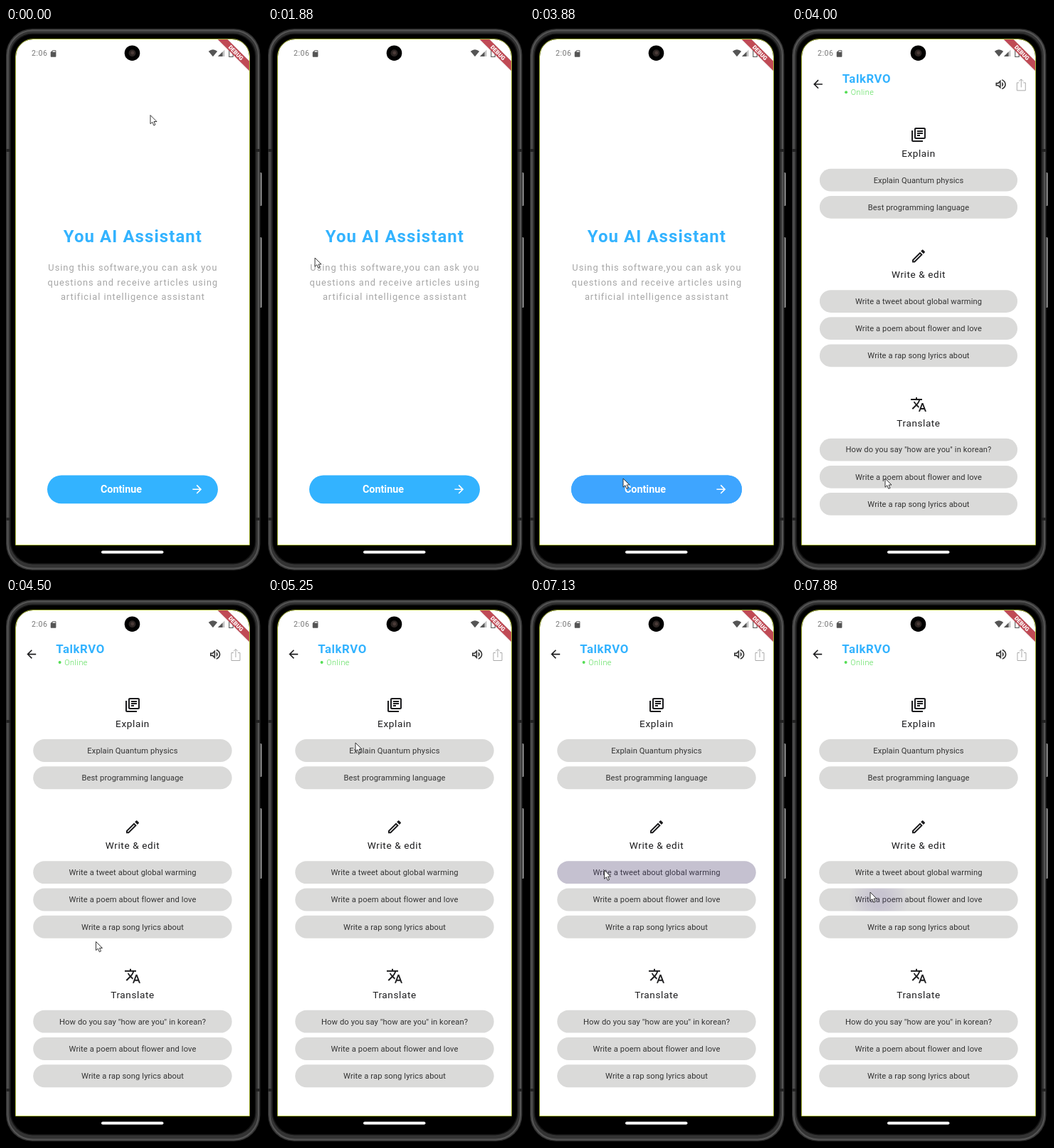
An HTML page for the animation above (8000 ms loop, 360 by 763 pixels).

```html
<!DOCTYPE html>
<html lang="en">
<head>
<meta charset="utf-8">
<title>Assistant app demo</title>
<style>
  html, body { margin: 0; width: 100%; height: 100%; overflow: hidden; background: #000; }
  svg { display: block; width: 360px; height: 763px; font-family: Roboto, sans-serif; }
  .mid { text-anchor: middle; }
  .title { font-size: 24px; font-weight: 600; letter-spacing: 1.05px; fill: #33b3ff; }
  .intro { font-size: 12.8px; letter-spacing: 1px; fill: #a6a6a6; }
  .action { font-size: 14.4px; font-weight: 600; fill: #fff; }
  .name { font-size: 16.8px; font-weight: 600; letter-spacing: .6px; fill: #33b3ff; }
  .online { font-size: 10.8px; font-weight: 300; letter-spacing: .5px; fill: #55dd55; }
  .heading { font-size: 13.6px; letter-spacing: .6px; fill: #1c1c1e; }
  .label { font-size: 11.2px; letter-spacing: .1px; fill: #333; }
  .clock { font-size: 10.6px; letter-spacing: .5px; fill: #777; }
  .debug { font-size: 8.1px; font-weight: 900; fill: #fff; }
</style>
</head>
<body>
<svg viewBox="0 0 360 763">
  <defs>
    <clipPath id="screen"><path d="M14 726V40a24 24 0 0 1 24-24H318a24 24 0 0 1 24 24V726z"/></clipPath>
    <clipPath id="button"><rect x="58" y="628.5" width="240" height="39.7" rx="19.85"/></clipPath>
    <clipPath id="poem"><rect x="38.2" y="406.5" width="279.5" height="31.9" rx="15.95"/></clipPath>
    <radialGradient id="ink">
      <stop offset=".25" stop-color="#6750a4" stop-opacity=".16"/>
      <stop offset="1" stop-color="#6750a4" stop-opacity="0"/>
    </radialGradient>
  </defs>

  <!-- phone body -->
  <g fill="#777">
    <rect x="355" y="203" width="5" height="47" rx="1.5"/>
    <rect x="355" y="294" width="5" height="99" rx="1.5"/>
  </g>
  <rect x="0" y="1" width="357.5" height="761" rx="37" fill="#333"/>
  <rect x="2.5" y="3.5" width="352.5" height="756" rx="35" fill="none" stroke="#555" stroke-width="2"/>
  <path d="M0 172h6M351 172h6M0 690h6M351 690h6" stroke="#222" stroke-width="4"/>
  <rect x="5.5" y="7.5" width="346" height="746" rx="32" fill="#141414"/>
  <rect x="7" y="9" width="343" height="743" rx="31"/>
  <rect x="134" y="734.5" width="87.5" height="4" rx="2" fill="#fff"/>

  <g clip-path="url(#screen)">
    <rect x="14" y="16" width="328" height="710" fill="#fff"/>

    <g id="welcome">
      <text class="mid title" x="178.4" y="300.5">You AI Assistant</text>
      <g class="mid intro">
        <text x="178.4" y="341.3">Using this software,you can ask you</text>
        <text x="178.4" y="361.8">questions and receive articles using</text>
        <text x="178.4" y="382.3">artificial intelligence assistant</text>
      </g>
      <g clip-path="url(#button)">
        <rect x="58" y="628" width="240" height="41" fill="#33b3ff"/>
        <circle id="press" cx="133" cy="648" fill="#3ea5ff"/>
      </g>
      <text class="mid action" x="162" y="653.2">Continue</text>
      <path fill="#fff" transform="translate(259.2 638.6) scale(.8)"
        d="M12 4l-1.41 1.41L16.17 11H4v2h12.17l-5.58 5.59L12 20l8-8z"/>
    </g>

    <g id="chat">
      <path fill="#1c1c1e" transform="translate(26.2 68) scale(.8)"
        d="M20 11H7.83l5.59-5.59L12 4l-8 8 8 8 1.41-1.41L7.83 13H20v-2z"/>
      <text class="name" x="70.3" y="75.8">TalkRVO</text>
      <circle cx="75.6" cy="89" r="2" fill="#55dd55"/>
      <text class="online" x="82.3" y="92.8">Online</text>
      <path fill="#333" transform="translate(284.6 68.2) scale(.8)"
        d="M3 9v6h4l5 5V4L7 9H3zm7-.17v6.34L7.83 13H5v-2h2.83L10 8.83zM16.5 12c0-1.77-1.02-3.29-2.5-4.03v8.05c1.48-.73 2.5-2.25 2.5-4.02zM14 3.23v2.06c2.89.86 5 3.54 5 6.71s-2.11 5.85-5 6.71v2.06c4.01-.91 7-4.49 7-8.77s-2.99-7.86-7-8.77z"/>
      <path fill="none" stroke="#aaa" d="M320 75.5h-3v11h12v-11h-3M323 82V70.5M320 73.5l3-3 3 3"/>
      <g id="sections"></g>
      <g id="tints" fill="#6750a4">
        <rect x="38.2" y="197" width="279.5" height="31.9" rx="15.95"/>
        <rect x="38.2" y="368.2" width="279.5" height="31.9" rx="15.95"/>
      </g>
      <g clip-path="url(#poem)"><circle id="splash" cx="122" cy="422" r="43" fill="url(#ink)"/></g>
    </g>

    <!-- status bar -->
    <text class="clock" x="36" y="39.2">2:06</text>
    <g fill="#555">
      <path transform="translate(60.8 30.2) scale(.48)"
        d="M18 2h-8L4 8v12c0 1.1.9 2 2 2h12c1.1 0 2-.9 2-2V4c0-1.1-.9-2-2-2zm-6 6h-2V4h2zm3 0h-2V4h2zm3 0h-2V4h2z"/>
      <path d="M284.8 32.8Q291 27.8 297.2 32.8L291 40.2z"/>
      <path d="M298 40L307.5 30.5V40z" opacity=".35"/>
      <path d="M298 40L304.5 33.5V40z"/>
    </g>
    <path d="M313.8 31.5h5.4v9h-5.4zM315.5 30.3h2" fill="none" stroke="#555" stroke-width="1.1"/>
    <g transform="translate(342.5 15.5) rotate(45)">
      <rect x="-45" y="21.9" width="90" height="10.4" fill="#000" opacity=".15"/>
      <rect x="-45" y="22.3" width="90" height="9.6" fill="#c04a55"/>
      <text class="mid debug" y="30">DEBUG</text>
    </g>
  </g>
  <path d="M13.5 726.5V40a24.5 24.5 0 0 1 24.5-24.5H318a24.5 24.5 0 0 1 24.5 24.5V726.5z"
    fill="none" stroke="#aebc3c"/>
  <circle cx="177.5" cy="35.2" r="10.8"/>
  <circle cx="177.5" cy="35.2" r="5" fill="#2b2422"/>
  <circle cx="177.8" cy="35" r="2.4" fill="#4a3b38"/>

  <path id="cursor" fill="#fff" stroke="#222" stroke-width=".9" stroke-linejoin="round"
    d="M0 0V12.2L2.8 9.7 4.9 14.4 7 13.4 5 9H9z"/>
</svg>
<script>
  const $ = id => document.getElementById(id);
  const LOOP = 8000, STEP = 125;

  const sections = [
    { title: 'Explain', y: 149, icon: 'M4 6H2v14c0 1.1.9 2 2 2h14v-2H4V6zm16-4H8c-1.1 0-2 .9-2 2v12c0 1.1.9 2 2 2h12c1.1 0 2-.9 2-2V4c0-1.1-.9-2-2-2zm0 14H8V4h12v12zM10 9h8v2h-8zm0 3h4v2h-4zm0-6h8v2h-8z',
      items: ['Explain Quantum physics', 'Best programming language'] },
    { title: 'Write &amp; edit', y: 320.2, icon: 'M14.06 9.02l.92.92L5.92 19H5v-.92l9.06-9.06M17.66 3c-.25 0-.51.1-.7.29l-1.83 1.83 3.75 3.75 1.83-1.83c.39-.39.39-1.02 0-1.41l-2.34-2.34c-.2-.2-.45-.29-.71-.29zm-3.6 3.19L3 17.25V21h3.75L17.81 9.94l-3.75-3.75z',
      items: ['Write a tweet about global warming', 'Write a poem about flower and love', 'Write a rap song lyrics about'] },
    { title: 'Translate', y: 529.7, icon: 'M12.87 15.07l-2.54-2.51.03-.03c1.74-1.94 2.98-4.17 3.71-6.53H17V4h-7V2H8v2H1v1.99h11.17C11.5 7.92 10.44 9.75 9 11.35 8.07 10.32 7.3 9.19 6.69 8h-2c.73 1.63 1.73 3.17 2.98 4.56l-5.09 5.02L4 19l5-5 3.11 3.11.76-2.04zM18.5 10h-2L12 22h2l1.12-3h4.75L21 22h2l-4.5-12zm-2.62 7l1.62-4.33L19.12 17h-3.24z',
      items: ['How do you say "how are you" in korean?', 'Write a poem about flower and love', 'Write a rap song lyrics about'] }
  ];

  const pill = (label, y) => `
    <rect x="38.2" y="${y}" width="279.5" height="31.9" rx="15.95" fill="#dadad9"/>
    <text class="mid label" x="178" y="${y + 19.8}">${label}</text>`;

  $('sections').innerHTML = sections.map(({ title, y, icon, items }) => `
    <path fill="#1c1c1e" transform="translate(166 ${y - 12})" d="${icon}"/>
    <text class="mid heading" x="178" y="${y + 30.8}">${title}</text>
    ${items.map((label, i) => pill(label, y + 48 + i * 38.33)).join('')}`).join('');

  // time, x, y of the pointer tip
  const path = [
    [0, 203, 122.5], [750, 203, 122.5], [1625, 64, 318], [1875, 66, 323], [2500, 116, 560],
    [3000, 131, 633], [4375, 131, 633], [4625, 122, 330], [4750, 122, 330], [5250, 123, 202],
    [5625, 123, 202], [6375, 105, 310], [6750, 104.5, 381], [7125, 104.5, 381],
    [7500, 110, 412], [LOOP, 110, 412]
  ];

  function pointer(t) {
    const i = path.findIndex(k => k[0] > t);
    const [t0, x0, y0] = path[i - 1], [t1, x1, y1] = path[i];
    const u = (t - t0) / (t1 - t0), e = u * u * (3 - 2 * u);
    return [x0 + (x1 - x0) * e, y0 + (y1 - y0) * e];
  }

  // a tapped pill lights up at once, then fades
  const tapTint = (t, start) => t < start ? 0 : .18 * Math.max(0, 1 - (t - start) / 375);

  function draw(now) {
    const t = Math.floor(now % LOOP / STEP) * STEP;
    const inChat = t >= 4000;
    $('welcome').style.display = inChat ? 'none' : '';
    $('chat').style.display = inChat ? '' : 'none';

    $('press').setAttribute('r', t < 3625 ? 0 : 45 + (t - 3625) * .6);
    const scale = 1 - .0047 * Math.max(0, 1 - (t - 4000) / 250) ** 2;
    $('chat').setAttribute('transform', `translate(178 371) scale(${scale}) translate(-178 -371)`);

    const [first, second] = $('tints').children;
    first.setAttribute('opacity', tapTint(t, 5625));
    second.setAttribute('opacity', tapTint(t, 7125));
    $('splash').setAttribute('opacity', t >= 7875 ? 1 : 0);

    $('cursor').setAttribute('transform', `translate(${pointer(t)})`);
    requestAnimationFrame(draw);
  }

  draw(0);
</script>
</body>
</html>
```
